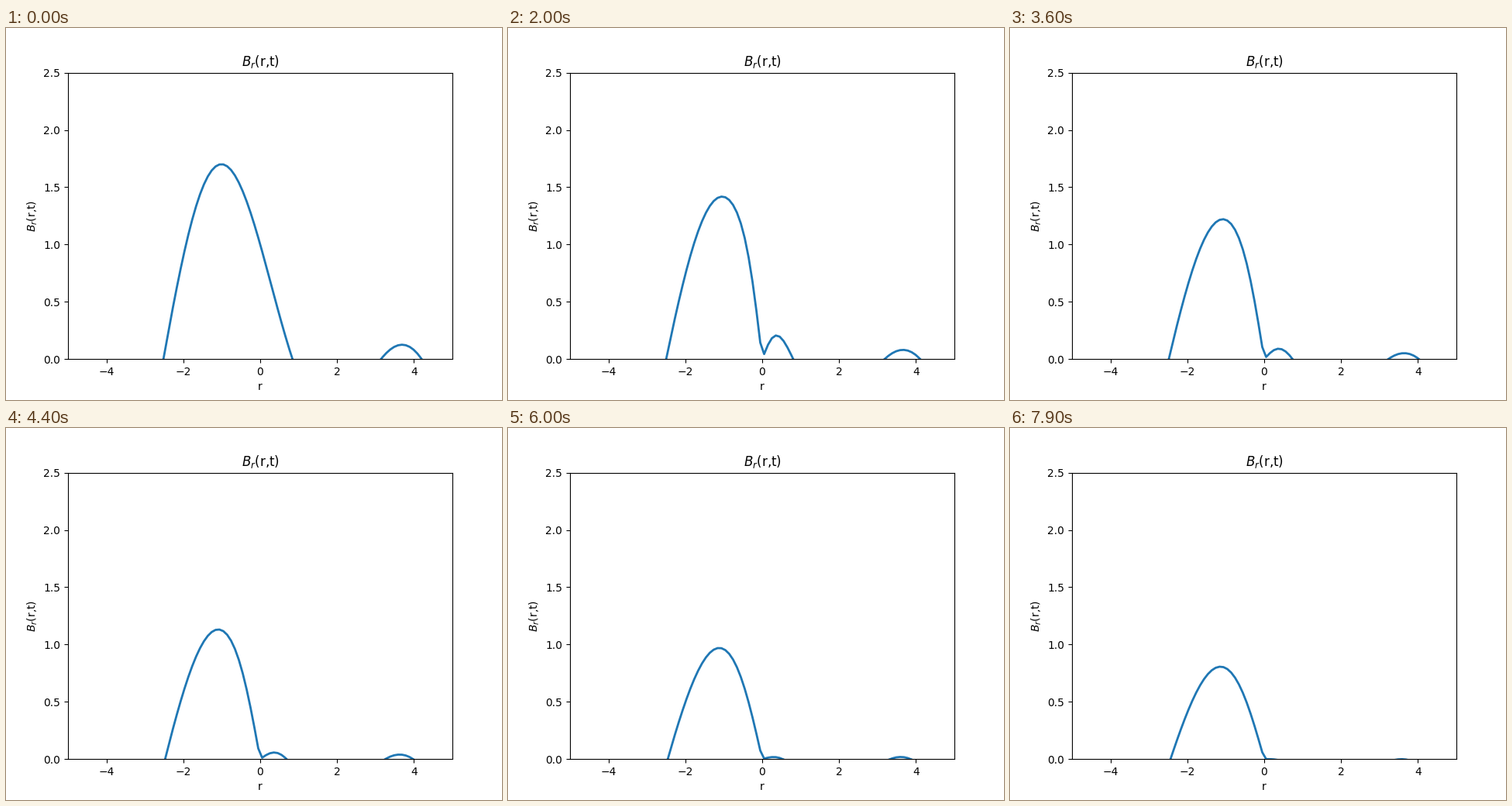
Write a matplotlib script that moves like this. It is 640x480 px and loops after 8000 ms.

```python
import numpy as np
import matplotlib.pyplot as plt
from matplotlib.animation import FuncAnimation

FRAMES = 80
DT = 0.2 / 99        # diffusion time per frame
SUBSTEPS = 50
DR = 10 / 99

# Grid straddles r = 0 and reaches past the visible range on both sides
r = (np.arange(-80, 80) + 0.5) * DR


def step_matrix():
    """One frame of dB/dt = d/dr(1/r d(rB)/dr) - pi^2/4 B."""
    n = len(r)
    up, down = np.eye(n, k=1), np.eye(n, k=-1)
    second = (up - 2 * np.eye(n) + down) / DR**2
    first = (up - down) / (2 * DR)
    op = second + first / r[:, None] - np.diag(1 / r**2 + np.pi**2 / 4)
    return np.linalg.matrix_power(np.eye(n) + op * DT / SUBSTEPS, SUBSTEPS)


step = step_matrix()
field = [np.cos(0.685 * r) - np.sin(1.185 * r)]
for _ in range(FRAMES - 1):
    field.append(step @ field[-1])

fig, ax = plt.subplots(figsize=(6.4, 4.8), dpi=100)
ax.set(xlim=(-5, 5), ylim=(0, 2.5), xlabel="r",
       ylabel="$B_r$(r,t)", title="$B_r$(r,t)")
line, = ax.plot(r, field[0], lw=2, color="C0")


def update(i):
    line.set_ydata(field[i])
    return line,


anim = FuncAnimation(fig, update, frames=FRAMES, interval=100,
                     repeat=True, repeat_delay=0)
plt.show()
```
